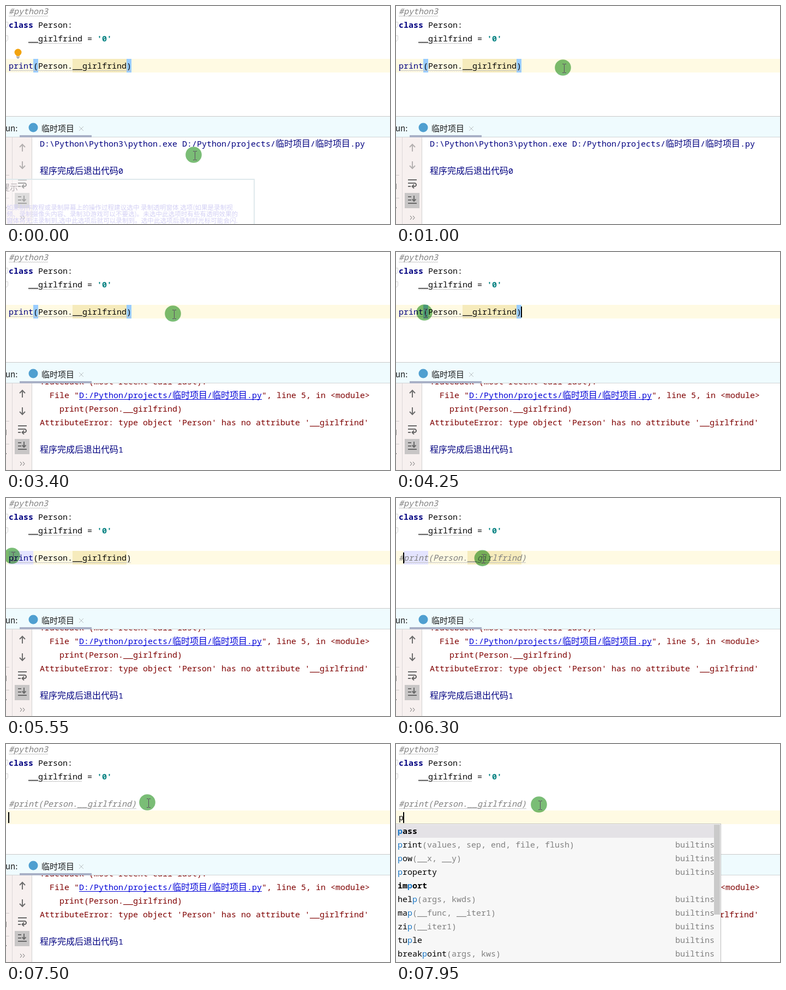
These frames come from a looping animation (704 px wide and 400 px high, 8000 ms). An HTML page with a canvas:

```html
<!DOCTYPE html>
<html lang="zh">
<head>
<meta charset="utf-8">
<title>Private class attribute</title>
<style>
html, body { margin: 0; width: 100%; height: 100%; overflow: hidden; background: #fff; }
canvas { display: block; }
</style>
</head>
<body>
<canvas id="stage" width="704" height="400"></canvas>
<script>
const c = document.getElementById('stage').getContext('2d');
const LOOP = 8000, STEP = 50, CH = 9, HAN = 16;
const MONO = '"Noto Sans Mono", "DejaVu Sans Mono", monospace';
const SANS = '"Noto Sans CJK SC", "Noto Sans CJK", "Noto Sans", sans-serif';
const NAVY = '#000080', RED = '#7f0000', GREY = '#808080', BLACK = '#080808';

// pointer path: time, x, y
const PATH = [
  [0, 344, 273], [50, 328, 205], [100, 300, 141], [200, 300, 141],
  [550, 306, 113], [3850, 306, 113], [3900, 294, 118], [4050, 200, 126],
  [4150, 118, 120], [4250, 52, 111], [4450, 11, 106], [5700, 11, 106],
  [6000, 70, 112], [6550, 232, 109], [6650, 250, 107], [7000, 259, 107],
  [7800, 259, 107], [7900, 262, 111], [8000, 262, 111]
];

// caret: start time, x, row top (no x = hidden)
const CARET = [
  [0], [500, 230, 97], [1000], [1500, 230, 97], [2400], [2900, 230, 97], [3400],
  [3900, 230, 97], [4750, 5, 97], [5550], [6000, 14, 97], [6950, 239, 97], [7500, 5, 122],
  [7800, 14, 122]
];

const COMPLETIONS = [
  ['pass'], ['print', '(values, sep, end, file, flush)'], ['pow', '(__x, __y)'],
  ['property', ''], ['import'], ['help', '(args, kwds)'], ['map', '(__func, __iter1)'],
  ['zip', '(__iter1)'], ['tuple', ''], ['breakpoint', '(args, kws)']
];

function box(x, y, w, h, color) {
  c.fillStyle = color;
  c.fillRect(x, y, w, h);
}

// Mixed text on a fixed grid; returns the end x.
function text(str, x, y, color = BLACK, style = '') {
  c.fillStyle = color;
  for (const run of str.match(/[\u3000-\u9fff]+|[^\u3000-\u9fff]+/g) || []) {
    const han = run.charCodeAt(0) >= 0x3000;
    c.font = han ? `${HAN}px ${SANS}` : `${style} 15px ${MONO}`;
    c.fillText(run, x, y);
    x += run.length * (han ? HAN : CH);
  }
  return x;
}

function label(str, x, y, size, color) {
  c.font = `${size}px ${SANS}`;
  c.fillStyle = color;
  c.fillText(str, x, y);
}

function line(points, color, width = 1) {
  c.strokeStyle = color;
  c.lineWidth = width;
  c.beginPath();
  points.forEach(([x, y]) => c.lineTo(x, y));
  c.stroke();
}

function wave(x0, x1, y) {
  const pts = [];
  for (let x = x0; x <= x1; x += 2) pts.push([x, y + (x - x0) % 4 / 2]);
  line(pts, '#c3c3c3');
}

function disc(x, y, r, color) {
  c.fillStyle = color;
  c.beginPath();
  c.arc(x, y, r, 0, 7);
  c.fill();
}

function pointerAt(t) {
  const i = Math.max(1, PATH.findIndex(p => p[0] >= t));
  const [t0, x0, y0] = PATH[i - 1], [t1, x1, y1] = PATH[i];
  const k = (t - t0) / (t1 - t0);
  return [x0 + (x1 - x0) * k, y0 + (y1 - y0) * k];
}

function bulb() {
  disc(22, 85, 6.5, '#f2a30f');
  box(19, 89, 6, 3, '#f2a30f');
  box(19, 93, 6, 1, '#6e6e6e');
  box(20, 95, 4, 1, '#6e6e6e');
}

function fold(y) {
  line([[0, y - 5.5], [3.5, y - 5.5], [3.5, y + 2], [0, y + 5]], '#d5d5d5');
}

function editor(t) {
  box(0, 0, 704, 203, '#fff');
  box(0, t < 7500 ? 97 : 122, 704, 25, '#fffae3');
  fold(35);
  fold(60);

  const commented = t >= 6000;
  const x = commented ? 14 : 5;
  if (t < 6950) box(x + 117, 97, 99, 25, '#f6ebbc');
  if (t < 4750) {
    box(50, 97, 9, 25, '#99ccff');
    box(221, 97, 9, 25, '#99ccff');
  }
  if (t >= 5100 && t < 6950) box(x, 97, 45, 25, '#e4e4ff');

  wave(5, 77, 18);
  wave(41, 140, 68);
  wave(t >= 7200 ? 5 : x, x + 225, 118);

  text('#python3', 5, 15, GREY, 'italic');
  text(' Person:', text('class', 5, 40, NAVY, 'bold'), 40);
  text("'0'", text('__girlfrind = ', 41, 65), 65, '#008080', 'bold');
  if (commented) text('#print(Person.__girlfrind)', 5, 115, GREY, 'italic');
  else text('(Person.__girlfrind)', text('print', 5, 115, NAVY), 115);
  if (t >= 7800) text('p', 5, 140);
  if (t < 250 || (t >= 5600 && t < 6000)) bulb();

  const [, cx, cy] = CARET.filter(k => k[0] <= t).pop();
  if (cx) box(cx - 1, cy + 3, 2, 20, '#000');
}

function arrow(y, dir, color) {
  line([[30, y - 7 * dir], [30, y + 7 * dir]], color, 2);
  line([[25, y - 1 * dir], [30, y - 6 * dir], [35, y - 1 * dir]], color, 2);
}

function toolbar(t) {
  box(0, 241, 48, 159, '#f7f0ef');
  box(11, 241, 1, 159, '#dcd8d8');
  box(47, 241, 1, 159, '#d2d2d2');
  box(0, 310, 6, 1, '#cfcaca');
  box(0, 352, 6, 1, '#cfcaca');
  box(0, 326, 1, 10, '#8c8c8c');
  box(0, 369, 1, 2, '#6e6e6e');

  const color = t < 2500 ? '#b5b1b1' : '#6e6e6e';
  arrow(260, 1, color);
  arrow(292, -1, color);

  const ink = '#696969';
  box(22, 318, 16, 2, ink);
  line([[22, 325], [35, 325], [37, 327], [37, 329], [35, 331], [30, 331]], ink, 2);
  line([[33, 327.5], [29.5, 331], [33, 334.5]], ink, 2);
  box(22, 330, 5, 2, ink);

  box(16, 343, 27, 28, '#c8c6c6');
  box(22, 361, 16, 2, ink);
  box(22, 349, 6, 2, ink);
  box(22, 355, 6, 2, ink);
  line([[33, 348], [33, 358]], ink, 2);
  line([[29.5, 354.5], [33, 358], [36.5, 354.5]], ink, 2);
  for (const x of [26, 31]) line([[x, 385], [x + 3, 388.5], [x, 392]], ink);
}

function consoleText(t) {
  const path = 'D:/Python/projects/临时项目/临时项目.py';
  if (t < 2200) {
    text('D:\\Python\\Python3\\python.exe ' + path, 62, 258, NAVY);
    if (t < 2000) text('程序完成后退出代码0', 62, 308, NAVY);
    return;
  }
  text('Traceback (most recent call last):', 62, 243, RED);
  const start = text('  File "', 62, 268, RED);
  const end = text(path, start, 268, '#0000d8');
  box(start, 270, end - start, 1, '#0000d8');
  text('", line 5, in <module>', end, 268, RED);
  text('    print(Person.__girlfrind)', 62, 293, RED);
  text("AttributeError: type object 'Person' has no attribute '__girlfrind'", 62, 318, RED);
  text('程序完成后退出代码1', 62, 368, NAVY);
}

function runPanel(t) {
  box(0, 241, 704, 159, '#fff');
  consoleText(t);
  toolbar(t);
  box(0, 203, 704, 38, '#effbfe');
  box(0, 202, 704, 1, '#c9c9c9');
  box(0, 240, 704, 1, '#d0d4d6');
  box(25, 237, 132, 4, '#a8b0c6');
  label('un:', -1, 230, 15, '#1a1a1a');
  disc(50, 223, 8.5, '#4f9fd0');
  label('临时项目', 65, 230, 15, '#1a1a1a');
  line([[134, 221], [142, 229]], '#b9c0c4');
  line([[142, 221], [134, 229]], '#b9c0c4');
}

function hint(alpha) {
  c.globalAlpha = alpha;
  box(0, 318, 455, 82, 'rgba(255,255,255,.4)');
  line([[0, 318], [455, 318], [455, 400]], '#dfe9ec', 2);
  label('提示', -8, 338, 15, '#b3adb0');
  [
    '如果制作教程或录制屏幕上的操作过程建议选中 录制透明窗体 选项(如果是录制视',
    '频、录制摄像头内容、录制3D游戏可以不要选)。未选中此选项时有些有透明效果的',
    '窗体将无法录制到,选中此选项后就可以录制到。选中此选项后录制时光标可能会闪.'
  ].forEach((s, i) => label(s, 1, 374 + i * 12, 11.6, '#d3d0f5'));
  c.globalAlpha = 1;
}

function completions() {
  box(0, 146, 596, 254, '#f7f7f7');
  box(0, 148, 583, 24, '#e4e2e6');
  box(0, 146, 596, 1, '#bdbdbd');
  box(595, 146, 1, 254, '#bdbdbd');
  COMPLETIONS.forEach(([name, args], i) => {
    const y = 165 + i * 25, p = name.indexOf('p');
    const style = args === undefined ? 'bold' : '';
    let x = text(name.slice(0, p), 3, y, '#000', style);
    x = text('p', x, y, '#1a76c4', style);
    x = text(name.slice(p + 1), x, y, '#000', style);
    if (args === undefined) return;
    text(args, x, y, GREY);
    text('builtins', 512, y, GREY);
  });
  box(583, 148, 11, 165, '#cacaca');
}

function pointer(t) {
  const [x, y] = pointerAt(t);
  c.globalCompositeOperation = 'multiply';
  disc(x, y, 14.8, '#7abd76');
  c.globalCompositeOperation = 'source-over';
  if (t >= 6550 && t < 6800) {
    c.beginPath();
    [[0, 0], [0, 16], [4, 12.5], [6.5, 18], [9, 17], [6.5, 11.5], [11.5, 11.5]]
      .forEach(([dx, dy]) => c.lineTo(x + dx + .5, y + dy + .5));
    c.closePath();
    c.fillStyle = '#fff';
    c.fill();
    c.strokeStyle = '#000';
    c.lineWidth = 1;
    c.stroke();
    return;
  }
  const bx = Math.round(x) + 2.5, by = Math.round(y) + 1, ink = '#5c4a62';
  line([[bx, by - 7], [bx, by + 8]], ink);
  for (const sy of [by - 7.5, by + 8.5]) {
    line([[bx - 3.5, sy], [bx - .5, sy]], ink);
    line([[bx + .5, sy], [bx + 3.5, sy]], ink);
  }
}

function frame(now) {
  const t = Math.floor(now % LOOP / STEP) * STEP;
  editor(t);
  runPanel(t);
  if (t < 100) hint(t < 50 ? 1 : .4);
  if (t >= 7900) completions();
  pointer(t);
  requestAnimationFrame(frame);
}
requestAnimationFrame(frame);
</script>
</body>
</html>
```
